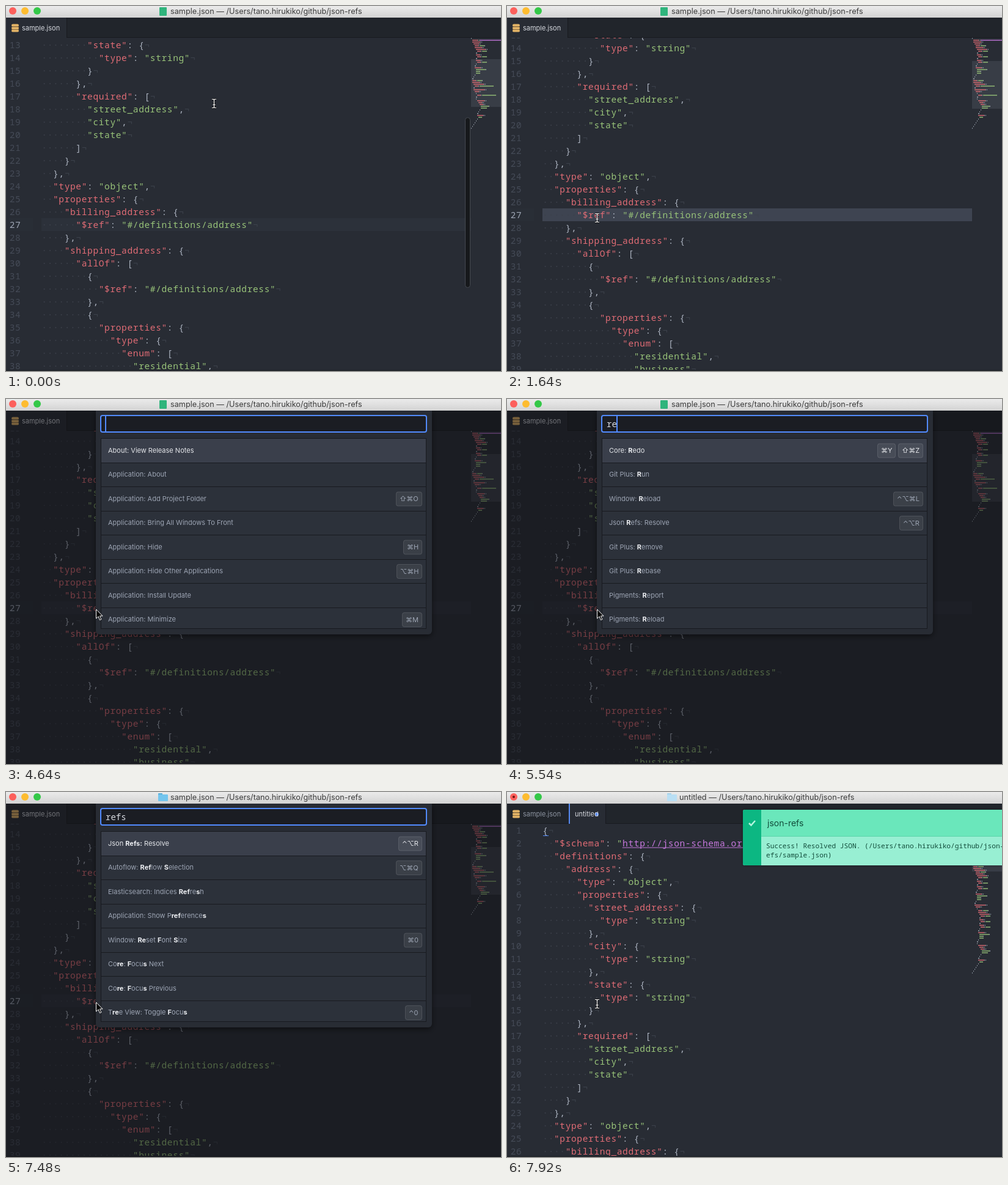
These frames come from a looping animation (810 by 597 pixels, 8000 ms). An HTML page with a canvas:

```html
<!DOCTYPE html>
<html lang="en">
<head>
<meta charset="utf-8">
<title>Resolving JSON references</title>
<style>
html, body { margin: 0; width: 100%; height: 100%; overflow: hidden; background: #282c34; }
canvas { display: block; }
</style>
</head>
<body>
<canvas id="stage" width="810" height="597"></canvas>
<script>
const ctx = document.getElementById('stage').getContext('2d');
const LOOP = 8000, TOP = 52, LEFT = 58, ROW = 21, CHAR = 9.342, CODE_SIZE = 14.5;
const mono = px => `${px}px "Noto Sans Mono", monospace`;
const sans = (px, weight = 400) => `${weight} ${px}px Inter, "DejaVu Sans", sans-serif`;
const CODE = mono(CODE_SIZE), TRACKING = CHAR - CODE_SIZE * .6;
const BLUE = '#528bff', BG = '#282c34', LINE = '#181a1f';
const COLORS = { key: '#e06c75', url: '#c678dd', str: '#98c379', mark: '#abb2bf' };
const HOME = '/Users/tano.hirukiko/github/json-refs';

// The two documents: with references and resolved
const string = { type: 'string' };
const address = {
  type: 'object',
  properties: { street_address: string, city: string, state: string },
  required: ['street_address', 'city', 'state']
};
const schema = ref => ({
  $schema: 'http://json-schema.org/draft-04/schema#',
  definitions: { address },
  type: 'object',
  properties: {
    billing_address: ref,
    shipping_address: {
      allOf: [ref, { properties: { type: { enum: ['residential', 'business'] } }, required: ['type'] }]
    }
  }
});
const TOKEN = /(?<key>"[^"]*"(?=:))|(?<url>http[^"]+)|(?<str>"(?!http)[^"]*"|")|(?<mark>[^\s"]+)/g;
const parse = doc => JSON.stringify(doc, null, 2).split('\n').map(line => ({
  length: line.length,
  indent: line.search(/\S/),
  tokens: [...line.matchAll(TOKEN)].map(m => ({
    text: m[0], col: m.index, kind: Object.keys(m.groups).find(k => m.groups[k])
  }))
}));
const sample = parse(schema({ $ref: '#/definitions/address' }));
const resolved = parse(schema(address));

// Palette entries: *matched* letters, then key bindings after bars
const ALL = [
  'About: View Release Notes', 'Application: About', 'Application: Add Project Folder|⇧⌘O',
  'Application: Bring All Windows To Front', 'Application: Hide|⌘H',
  'Application: Hide Other Applications|⌥⌘H', 'Application: Install Update', 'Application: Minimize|⌘M'
];
const FOUND_R = [
  'Core: *R*edo|⇧⌘Z|⌘Y', 'Git Plus: *R*un', 'Window: *R*eload|⌃⌥⌘L', 'Json *R*efs: Resolve|⌃⌥R',
  'Git Plus: *R*emove', 'Git Plus: *R*ebase', 'Pigments: *R*eport', 'Pigments: *R*eload'
];
const FOUND_REFS = [
  'Json *Refs:* Resolve|⌃⌥R', 'Autoflow: *Ref*low *S*election|⌥⌘Q',
  'Elasticsearch: Indices *Ref*re*s*h', 'Application: Show P*ref*erence*s*',
  'Window: *Re*set *F*ont *S*ize|⌘0', 'Co*re*: *F*ocu*s* Next', 'Co*re*: *F*ocu*s* Previous',
  'T*re*e View: Toggle *F*ocu*s*|⌃0'
];

function box(x, y, w, h, fill, radius = 0, stroke) {
  ctx.beginPath();
  ctx.roundRect(x, y, w, h, radius);
  ctx.fillStyle = fill;
  ctx.fill();
  if (stroke) {
    ctx.strokeStyle = stroke;
    ctx.stroke();
  }
}

function disc(x, y, r, fill) {
  ctx.beginPath();
  ctx.arc(x, y, r, 0, 7);
  ctx.fillStyle = fill;
  ctx.fill();
}

// Draws a string and returns its width
function text(str, x, y, font, fill, baseline = 'middle') {
  ctx.font = font;
  ctx.fillStyle = fill;
  ctx.textBaseline = baseline;
  ctx.fillText(str, x, y);
  return ctx.measureText(str).width;
}

function code(str, x, y, fill) {
  ctx.letterSpacing = `${TRACKING}px`;
  text(str, x + TRACKING / 2, y, CODE, fill, 'alphabetic');
  ctx.letterSpacing = '0px';
}

function clipped(x, y, w, h, paint) {
  ctx.save();
  ctx.beginPath();
  ctx.rect(x, y, w, h);
  ctx.clip();
  paint();
  ctx.restore();
}

function folder(x, fill, tab) {
  box(x, 2, 7, 5, tab, 1);
  box(x, 4, 16, 11, fill, 1);
}

function titleBar(t, untitled, modified) {
  const shade = ctx.createLinearGradient(0, 0, 0, 19);
  shade.addColorStop(0, '#ebebeb');
  shade.addColorStop(1, '#d3d3d3');
  box(0, 0, 810, 19, shade);
  ['#fc605c', '#fdbc30', '#34c848'].forEach((c, i) => disc(11 + 20 * i, 8, 6, c));
  if (modified) disc(11, 8, 2, '#6b1512');
  if (untitled) folder(262, '#b9dff4', '#a5d2ea');
  else if (t >= 7480) folder(249, '#73c5ee', '#58aedb');
  else box(251, 2, 12, 14, '#2fb47c', 1);
  text(`${untitled ? 'untitled' : 'sample.json'} — ${HOME}`, untitled ? 282 : 269, 9, sans(12.7), '#3c3c3c');
}

function tabs(untitled, modified) {
  box(0, 19, 810, 33, '#21252b');
  box(0, 51, 810, 1, LINE);
  if (untitled) {
    box(101, 19, 60, 33, BG);
    box(101, 19, 2, 33, '#568af2');
    box(161, 19, 1, 33, LINE);
    if (modified) disc(147, 36.5, 3, '#568af2');
    text('untitled', 111, 36.5, sans(11), '#d7dae0');
  } else {
    box(0, 19, 99, 33, BG);
    box(99, 19, 1, 33, LINE);
  }
  text('sample.json', 26, 36.5, sans(11), untitled ? '#8d94a1' : '#d7dae0');
  for (let i = 0; i < 3; i++) {
    box(9, 29.5 + i * 4.5, 12, 4, '#e5b567', [5, 5, 4, 4]);
    if (i) box(9, 29 + i * 4.5, 12, 1, '#8a6d42');
  }
}

function drawLine(line, n, y, active) {
  const base = y + 16;
  const label = String(n);
  code(label, 24 - label.length * CHAR, base, active ? '#9da5b4' : '#454b57');
  code('·'.repeat(line.indent), LEFT, base, '#3d424c');
  code('¬', LEFT + line.length * CHAR, base, '#3d424c');
  for (const { text: str, col, kind } of line.tokens) {
    const x = LEFT + col * CHAR;
    code(str, x, base, COLORS[kind]);
    if (kind === 'url') box(x, base + 1.5, str.length * CHAR, 1, COLORS.url);
  }
}

function minimap(lines, scroll) {
  box(761, TOP, 49, 543, BG);
  box(761, TOP + Math.floor(scroll / 7), 49, 78, '#383d46');
  ctx.globalAlpha = .68;
  lines.forEach((line, i) => line.tokens.forEach(k =>
    box(761 + k.col, TOP + 3 * i, k.text.length, 2, COLORS[k.kind])));
  ctx.globalAlpha = 1;
}

function editor(t, untitled, step) {
  const lines = untitled ? resolved : sample;
  const scroll = untitled ? 0 : 251 + Math.round(16 * Math.min(1, step / 3));
  const active = untitled ? 0 : 27;
  const activeY = TOP + 26 * ROW - scroll;
  const wordPicked = t >= 1490 && t < 1640, linePicked = t >= 1640 && t < 3140;
  box(0, TOP, 810, 545, BG);
  clipped(0, TOP, 810, 543, () => {
    if (active) {
      box(5, activeY, 39, ROW, '#292e36');
      if (wordPicked) box(LEFT + 7 * CHAR, activeY, 4 * CHAR, ROW, '#3e4451');
      else box(LEFT, activeY, 703, ROW, linePicked ? '#3e4451' : '#2c313a');
    } else {
      box(LEFT + 1, 71, 9, 1, BLUE);
    }
    lines.forEach((line, i) => {
      const y = TOP + i * ROW - scroll;
      if (y > 20 && y < 597) drawLine(line, i + 1, y, i + 1 === active);
    });
    const caret = t >= 1340 && t < 1490 || t >= 3140 && t < 3740 || t >= 4040 && t < 4640;
    if (caret) box(151, activeY, 2, ROW, BLUE);
    minimap(lines, scroll);
    if (step < 5) box(751.5, TOP + scroll * .52, 8, 278, '#17191c', 4, '#454950');
  });
  box(0, 595, 810, 2, '#21252b');
}

function bindings(keys, y, color) {
  let right = 681;
  for (const key of keys) {
    ctx.font = sans(11);
    const w = Math.round(ctx.measureText(key).width) + 12;
    box(right - w + .5, y - 11.5, w - 1, 23, 'rgba(255,255,255,.07)', 3, 'rgba(255,255,255,.13)');
    text(key, right - w + 6, y + .5, sans(11), color);
    right -= w + 4;
  }
}

function entry(item, i) {
  const [name, ...keys] = item.split('|');
  const top = 64.5 + 39.5 * i, y = 84.5 + 39.5 * i;
  const color = i ? '#9da5b4' : '#e4e6ea';
  box(156, top, 531, 40, i ? '#2c313a' : '#3a3f4b');
  box(156, Math.floor(top), 531, 1, LINE);
  let x = 167;
  name.split('*').forEach((part, k) => {
    x += text(part, x, y, sans(11, k % 2 ? 700 : 400), k % 2 ? '#eceef2' : color);
  });
  bindings(keys, y, color);
}

function palette(t) {
  box(0, 19, 810, 578, 'rgba(14,15,18,.5)');
  clipped(0, 19, 810, 578, () => {
    ctx.shadowColor = 'rgba(0,0,0,.5)';
    ctx.shadowBlur = 10;
    ctx.shadowOffsetY = 3;
    box(147, 19, 550, 366, '#282c34', [0, 0, 6, 6]);
  });
  ctx.lineWidth = 2;
  box(155, 27, 533, 27, '#1b1d23', 3, BLUE);
  ctx.lineWidth = 1;
  const typed = 'refs'.slice(0, [5390, 5540, 5690, 5980].filter(at => t >= at).length);
  text(typed, 163, 45.5, mono(14), '#d7dae0', 'alphabetic');
  const hidden = t >= 5090 && t < 5390 || t >= 6430 && t < 6880 || t >= 7180;
  if (!hidden) box(Math.round(162.4 + 8.4 * typed.length), 28, 2, 25, BLUE);
  const list = t < 5540 ? ALL : t < 5840 ? FOUND_R : FOUND_REFS;
  clipped(155, 64, 533, 312, () => list.forEach(entry));
  ctx.strokeStyle = LINE;
  ctx.strokeRect(155.5, 64.5, 532, 311);
}

function notification() {
  ctx.save();
  ctx.shadowColor = 'rgba(0,0,0,.35)';
  ctx.shadowBlur = 5;
  box(386, 29, 440, 91, '#98efd3', 3);
  ctx.restore();
  box(416, 29, 400, 43, '#6ae7bb');
  box(416, 72, 400, 1, '#5bd5aa');
  box(386, 29, 30, 91, '#0cb782', [3, 0, 0, 3]);
  ctx.strokeStyle = '#b5f5df';
  ctx.lineWidth = 2.5;
  ctx.stroke(new Path2D('M396 51l3.5 3.5 6.5-7.5'));
  ctx.lineWidth = 1;
  text('json-refs', 426, 51.5, sans(14), '#124d3b');
  text(`Success! Resolved JSON. (${HOME.slice(0, -4)}r`, 424, 92, mono(11.2), '#124d3b', 'alphabetic');
  text('efs/sample.json)', 424, 107, mono(11.2), '#124d3b', 'alphabetic');
}

function pointer(step, arrow) {
  const p = step / 7, ease = p * p * (3 - 2 * p);
  const x = Math.round(340 - 193 * ease), y = Math.round(159 + 187 * ease);
  ctx.save();
  ctx.translate(x, y);
  if (arrow) {
    const shape = new Path2D('M.5-2v15l3.6-3.3 2.4 5.8 2.4-1-2.4-5.6h4.6z');
    ctx.fillStyle = '#000';
    ctx.fill(shape);
    ctx.strokeStyle = '#fff';
    ctx.stroke(shape);
  } else {
    const shape = new Path2D('M-3-6.5h2.5l1 1 1-1H4M.5-5.5v12M-3 7.5h2.5l1-1 1 1H4M-1.5 2.5h4');
    [['#111', 2.6], ['#fff', 1.2]].forEach(([color, width]) => {
      ctx.strokeStyle = color;
      ctx.lineWidth = width;
      ctx.stroke(shape);
    });
  }
  ctx.restore();
}

function draw(now) {
  const t = now % LOOP;
  const untitled = t >= 7620, modified = t >= 7770;
  const step = t < 150 ? 0 : Math.min(7, 1 + Math.floor((t - 150) / 148.3));
  const choosing = t >= 4640 && !untitled;
  editor(t, untitled, step);
  tabs(untitled, modified);
  if (choosing) palette(t);
  titleBar(t, untitled, modified);
  if (t >= 7920) notification();
  pointer(step, choosing);
  requestAnimationFrame(draw);
}
requestAnimationFrame(draw);
</script>
</body>
</html>
```
